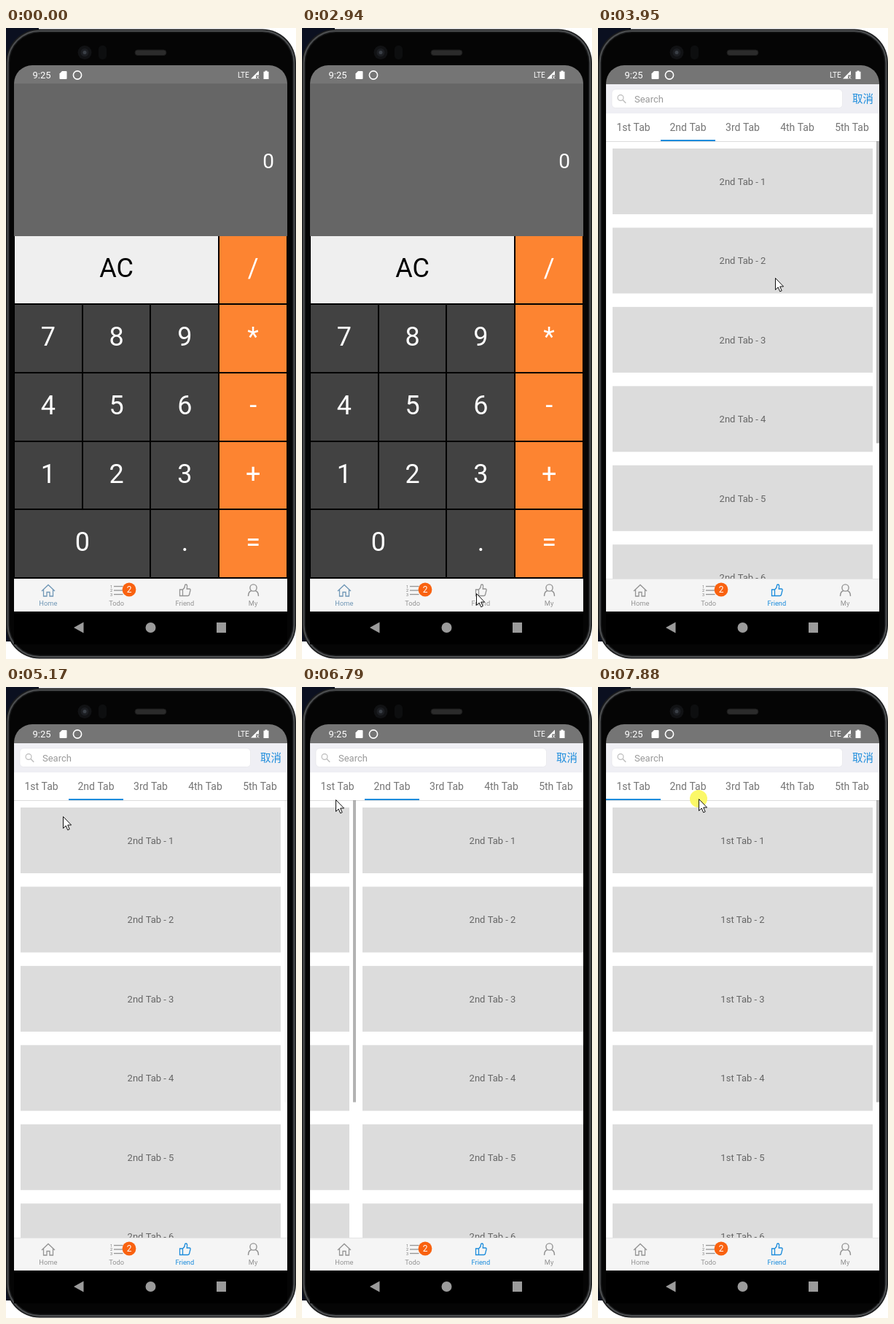
These frames come from a looping animation (398 px wide and 864 px high, 8 s). An HTML page with a canvas:

```html
<!DOCTYPE html>
<html lang="en">
<head>
<meta charset="utf-8">
<title>Phone app demo</title>
<style>
html, body { margin: 0; width: 100%; height: 100%; overflow: hidden; background: #fff; }
canvas { display: block; width: 398px; height: 864px; }
</style>
</head>
<body>
<canvas id="stage" width="398" height="864"></canvas>
<script>
const c = document.getElementById('stage').getContext('2d');
const LOOP = 8000, STEP = 70;
const LEFT = 11, RIGHT = 386, PAGE = 375, TAB = 75;
const BLUE = '#1c8cdc', GREY = '#949494';
const ROBOTO = 'Roboto, sans-serif';

// ---------- drawing helpers ----------
function rect(x, y, w, h, color) {
  c.fillStyle = color;
  c.fillRect(x, y, w, h);
}

function round(x, y, w, h, r, fill, stroke, width = 1) {
  c.beginPath();
  c.roundRect(x, y, w, h, r);
  paint(fill, stroke, width);
}

function disc(x, y, r, fill, stroke, width = 1) {
  c.beginPath();
  c.arc(x, y, r, 0, Math.PI * 2);
  paint(fill, stroke, width);
}

function shape(d, x, y, fill, stroke, width = 1) {
  c.save();
  c.translate(x, y);
  const p = new Path2D(d);
  if (fill) { c.fillStyle = fill; c.fill(p); }
  if (stroke) { c.strokeStyle = stroke; c.lineWidth = width; c.stroke(p); }
  c.restore();
}

function paint(fill, stroke, width) {
  if (fill) { c.fillStyle = fill; c.fill(); }
  if (stroke) { c.strokeStyle = stroke; c.lineWidth = width; c.stroke(); }
}

// Baselines sit on whole pixels so the glyphs stay crisp
function text(s, x, y, size, color, align = 'center', family = ROBOTO) {
  c.font = `${size}px ${family}`;
  c.textAlign = align;
  c.fillStyle = color;
  c.fillText(s, x, Math.round(y));
}

// ---------- timing helpers ----------
const lerp = (a, b, p) => a + (b - a) * p;
const easeOut = p => 1 - (1 - p) ** 2;
const easeInOut = p => p * p * (3 - 2 * p);
const tick = (t, start) => Math.floor((t - start) / STEP);
const within = (t, a, b) => t >= a && t < b;

// ---------- phone ----------
function drawPhone() {
  rect(0, 0, 398, 864, '#fff');
  rect(0, 0, 45, 840, '#0b1020');
  round(0, 1.5, 398, 862, 46, '#1a1b1c');
  round(2.5, 4, 393, 857, 44, null, '#4c4e50', 2);
  round(4.5, 6, 389, 853, 42, '#050505', '#151617', 1);

  disc(108, 33.5, 9.5, '#111214');
  disc(108, 33.5, 5.5, '#1c1e22');
  disc(108, 33.5, 2.5, '#3a3f46');
  round(127, 24, 11, 19, 5, '#0d0e0f');
  round(177, 30, 43, 7.5, 3.7, '#2b2b2b', '#191919', 1);

  rect(LEFT, 799, PAGE, 45, '#000');
  shape('M0 7.5 L13.5 0 V15 Z', 93, 813.5, '#9b9b9b');
  disc(198.5, 821, 7, '#9b9b9b');
  rect(289, 814, 13, 14, '#9b9b9b');
}

function drawStatusBar() {
  rect(LEFT, 51, PAGE, 26, '#757575');
  text('9:25', 36.5, 69, 13, '#fff', 'left');
  shape('M3.5 0 H9 Q10 0 10 1 V10 Q10 11 9 11 H1 Q0 11 0 10 V3.5 Z', 73.5, 59, '#fff');
  disc(98, 64.5, 5.6, null, '#fff', 1.6);
  text('LTE', 318, 68, 10, '#fff', 'left');
  shape('M0 11 L11 0 V6 H7 V11 Z', 336, 58.5, '#fff');
  shape('M8 7 L11 11 M11 7 L8 11', 336, 58.5, null, '#fff', 1);
  shape('M2 0 H5 V1.3 H7 V11.5 H0 V1.3 H2 Z', 353.5, 58.5, '#fff');
}

// ---------- calculator ----------
const CELL = PAGE / 4;
const colX = i => Math.round(10.9 + i * CELL);
const rowY = i => Math.round(284.4 + i * CELL);

function key(label, col, row, span, fill, ink) {
  const x = colX(col), y = rowY(row);
  rect(x + 1, y + 1, colX(col + span) - x - 2, rowY(row + 1) - y - 2, fill);
  text(label, LEFT + (col + span / 2) * CELL, y + 57, 36, ink);
}

function drawCalculator() {
  rect(LEFT, 76, PAGE, 209, '#666');
  text('0', 368, 192, 28, '#fff', 'right');
  rect(LEFT, 285, PAGE, 469, '#000');
  const dark = '#424242', orange = '#fd8431';
  key('AC', 0, 0, 3, '#efefef', '#000');
  key('0', 0, 4, 2, dark, '#fff');
  key('.', 2, 4, 1, dark, '#fff');
  ['789', '456', '123'].forEach((line, r) =>
    [...line].forEach((n, i) => key(n, i, r + 1, 1, dark, '#fff')));
  [...'/*-+='].forEach((op, r) => key(op, 3, r, 1, orange, '#fff'));
}

// ---------- friend list ----------
const NAMES = ['1st Tab', '2nd Tab', '3rd Tab', '4th Tab', '5th Tab'];

function drawPage(name, x, bar) {
  for (let i = 0; i < 6; i++) {
    const y = 165 + i * 108.45;
    rect(x + 9, y, 357, 90, '#dcdcdc');
    text(`${name} - ${i + 1}`, x + PAGE / 2, y + 50, 13, '#666');
  }
  if (bar > 0) rect(x + 371, 155, 4, 413.5, `rgba(128,128,128,${0.6 * bar})`);
}

function pagerAt(t) {
  const k = Math.min(3, tick(t, 6790));
  const shift = k < 0 ? 0 : [63, 220, 339, PAGE][k];
  let line = k < 1 ? LEFT + TAB : k < 2 ? 36 : LEFT;
  if (t < 3480) line = null;
  else if (t < 3550) line = LEFT;
  const fade = 1 - Math.max(0, tick(t, 4820) + 1) / 6.5;
  return { shift, line, fade: Math.max(0, fade) };
}

function drawFriends(t) {
  const { shift, line, fade } = pagerAt(t);
  rect(LEFT, 77, PAGE, 40, '#efeff4');
  round(19, 84, 316.5, 25.5, 5, '#fff', '#e3e3e8', 0.6);
  disc(31, 95.5, 3.9, null, '#bbb', 1.2);
  shape('M0 0 L4.2 4.2', 34, 98.5, null, '#bbb', 1.4);
  text('Search', 50, 102, 13, '#999', 'left');
  text('取消', 349, 102, 14.5, BLUE, 'left', '"Noto Sans CJK SC", "Noto Sans CJK", sans-serif');

  rect(LEFT, 117, PAGE, 637, '#fff');
  NAMES.forEach((name, i) => text(name, LEFT + TAB * (i + 0.5), 141, 14, '#757575'));
  rect(LEFT, 155, PAGE, 1, '#ddd');
  if (line !== null) rect(line, 153, TAB, 2, BLUE);

  c.save();
  c.beginPath();
  c.rect(LEFT, 155, PAGE, 599);
  c.clip();
  if (shift > 0) drawPage(NAMES[0], LEFT - PAGE + shift, 1);
  if (shift < PAGE) drawPage(NAMES[1], LEFT + shift, fade);
  c.restore();
}

// ---------- bottom tabs ----------
function drawTabBar(friend) {
  rect(LEFT, 754, PAGE, 45, '#f5f5f5');
  rect(LEFT, 754, PAGE, 0.7, '#ddd');
  const home = friend ? GREY : '#7097b6', like = friend ? BLUE : GREY;

  shape('M-9 1 L0 -7.5 L9 1 M-6.5 -1 V8 H-2 V2.5 H2 V8 H6.5 V-1', 58, 770, null, home, 1.3);
  for (let i = 0; i < 3; i++) {
    const y = 764.5 + i * 5.5;
    text(i + 1, 144.5, y + 2, 5.5, '#777');
    rect(148, y - 0.6, 12.5, 1.3, GREY);
  }
  disc(169, 769, 9.4, '#f96210');
  text('2', 169, 773, 12, '#fff');
  shape('M-7 -1 H-3 V7.5 H-7 Z M-3 -1 Q0 -3 0 -6.5 Q0 -8 1.5 -8 Q3.5 -8 3 -4.5 L2.7 -2 H6 Q8 -2 7.5 0 L6 6 Q5.6 7.5 4 7.5 H-3',
    245.5, 770, null, like, 1.3);
  disc(339.5, 766.5, 4.6, null, GREY, 1.4);
  shape('M-7 8 Q-7 1.5 -2.5 .5 M2.5 .5 Q7 1.5 7 8', 339.5, 770, null, GREY, 1.4);

  [['Home', home], ['Todo', GREY], ['Friend', like], ['My', GREY]].forEach(([s, color], i) =>
    text(s, LEFT + CELL * (i + 0.5), 791, 9.3, color));
}

// ---------- pointer ----------
// Each move: start time, number of steps, from, to, easing
const MOVES = [
  [930, 7, [304, 828], [239, 774], easeOut],
  [3810, 2, [239, 774], [243, 342], p => p],
  [4820, 5, [243, 342], [78, 177], easeOut],
  [5170, 4, [78, 177], [47, 102], easeInOut],
  [5710, 4, [47, 102], [46, 154], easeInOut],
  [7070, 8, [46, 154], [138, 153], easeInOut]
];
const CLICKS = [[2680, 2940], [6390, 6590], [7880, LOOP]];

function pointerAt(t) {
  const move = MOVES.filter(m => t >= m[0]).pop();
  if (!move) return null;
  const [start, steps, a, b, ease] = move;
  const p = ease(Math.min(1, tick(t, start) / steps));
  return [lerp(a[0], b[0], p), lerp(a[1], b[1], p)];
}

function drawPointer(t) {
  const at = pointerAt(t);
  if (!at) return;
  const [x, y] = at.map(Math.round);
  if (CLICKS.some(([a, b]) => within(t, a, b))) disc(x, y, 12, 'rgba(251,247,88,.9)');
  shape('M.5 .5 V16.5 L4.2 13 L6.7 18.8 L9.2 17.7 L6.7 12 H11.6 Z', x, y, '#fff', '#111', 1);
}

// ---------- main ----------
function frame(now) {
  const t = now % LOOP, friend = t >= 3340;
  drawPhone();
  c.save();
  c.beginPath();
  c.roundRect(LEFT, 51, PAGE, 793, [25, 25, 0, 0]);
  c.clip();
  drawStatusBar();
  if (friend) drawFriends(t);
  else drawCalculator();
  drawTabBar(friend);
  c.restore();
  drawPointer(t);
}

const begin = performance.now();
function run() {
  frame(performance.now() - begin);
  requestAnimationFrame(run);
}
run();
</script>
</body>
</html>
```
